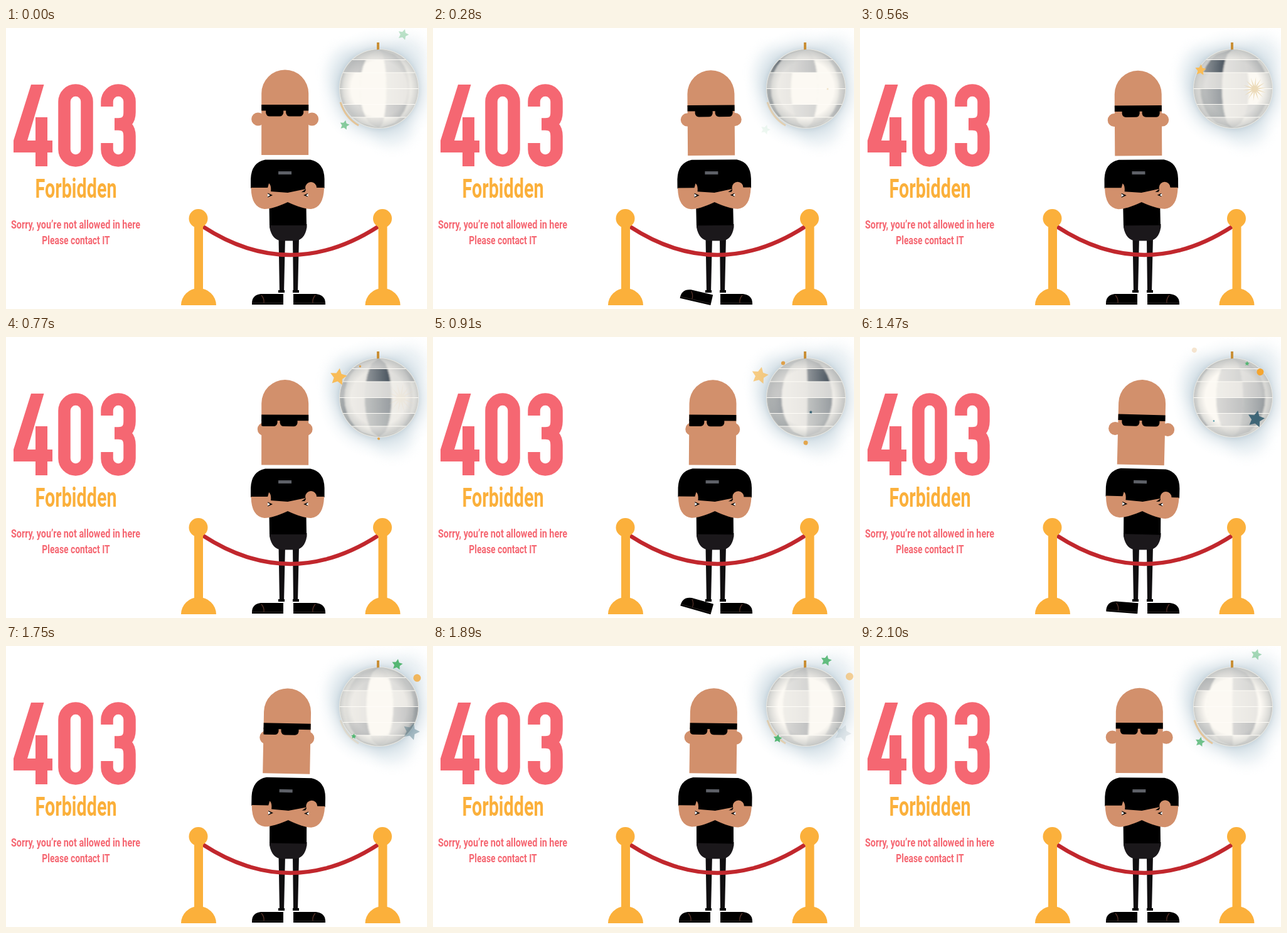
Write an HTML page that moves like this. It is 671 px wide and 447 px high and loops after 2.17 s.

```html
<!DOCTYPE html>
<html lang="en">
<head>
<meta charset="utf-8">
<title>403 Forbidden</title>
<style>
  html, body { margin: 0; width: 100%; height: 100%; overflow: hidden; background: #fff; }
  svg { display: block; width: 100%; height: 100%; }
  text { font-family: Roboto, "Liberation Sans", sans-serif; font-weight: 700; text-anchor: middle; }
  .skin { fill: #d2906c; }
  .gold { fill: #fbb03b; }
  .pink { fill: #f56772; }
</style>
</head>
<body>
<svg viewBox="0 0 671 447" xmlns="http://www.w3.org/2000/svg">
  <defs id="defs">
    <radialGradient id="glow">
      <stop offset=".62" stop-color="#a6bac6" stop-opacity=".65"/>
      <stop offset=".72" stop-color="#bccdd7" stop-opacity=".38"/>
      <stop offset=".86" stop-color="#d5e2e9" stop-opacity=".16"/>
      <stop offset="1" stop-color="#e6eef2" stop-opacity="0"/>
    </radialGradient>
    <radialGradient id="shade">
      <stop offset=".7" stop-color="#8a8f90" stop-opacity="0"/>
      <stop offset="1" stop-color="#767f84" stop-opacity=".35"/>
    </radialGradient>
    <filter id="soft" x="-10%" width="120%"><feGaussianBlur stdDeviation="1.6 0"/></filter>
    <filter id="haze" x="-50%" y="-50%" width="200%" height="200%"><feGaussianBlur stdDeviation="10"/></filter>
    <clipPath id="sphere"><circle cx="594.5" cy="96.5" r="62.5"/></clipPath>
    <clipPath id="face"><rect x="407" y="110" width="75" height="40"/></clipPath>
    <g id="post" class="gold">
      <circle cy="303" r="15"/>
      <rect x="-6.5" y="303" width="14" height="115"/>
      <path d="M-27.5 441a28 27 0 0 1 56 0z"/>
    </g>
  </defs>

  <g role="img" aria-label="403">
    <path class="pink" d="M40 90H60.500L34 179H47V142H66V179H74V198H66V220H47V198H12V179Z"/>
    <g fill="none" stroke="#f56772" stroke-width="19.5">
      <rect x="93" y="99" width="36" height="112" rx="18"/>
      <path d="M161 125V117a18 18 0 0 1 36 0V134q0 19-18 19h-6h6q18 0 18 19V193a18 18 0 0 1-36 0V183"/>
    </g>
  </g>
  <text class="gold" font-size="42" transform="translate(111.500 270) scale(.685 1)">Forbidden</text>
  <g class="pink" font-size="18">
    <text transform="translate(111 318.500) scale(.8 1)">Sorry, you’re not allowed in here</text>
    <text transform="translate(111.500 343.500) scale(.77 1)">Please contact IT</text>
  </g>

  <g id="disco">
    <g fill="#cddce4" filter="url(#haze)" opacity=".4">
      <ellipse cx="542" cy="70" rx="30" ry="40"/>
      <ellipse cx="640" cy="44" rx="30" ry="30"/>
      <ellipse cx="616" cy="162" rx="32" ry="26"/>
    </g>
    <circle cx="594" cy="97" r="97" fill="url(#glow)"/>
    <circle cx="594.5" cy="96.5" r="63.5" fill="#e9e8e2"/>
    <path id="rim" d="M533 118Q541 143 562 155" fill="none" stroke="#e8b877" stroke-width="3"/>
    <rect x="591" y="23" width="4" height="12" fill="#c98f36"/>
    <g clip-path="url(#sphere)">
      <g id="facets" filter="url(#soft)"></g>
      <circle cx="594.5" cy="96.5" r="63" fill="url(#shade)"/>
      <path d="M530 50.500H660M530 71H660M530 96.500H660M530 121.500H660M530 142H660" stroke="#fffdf8" stroke-width="1.200"/>
    </g>
    <g id="sparks"></g>
  </g>

  <path d="M434.500 333H445L443 421H436ZM457 333H467L465 421H458Z" fill="#100e10"/>
  <path d="M434 417h10v4h-10zM457 417h10v4h-10z" fill="#000"/>
  <g id="leftShoe">
    <path d="M392 440Q391 425 406 423H442V440Z"/>
    <path d="M407 425Q412 431 411 437" fill="none" stroke="#593329" stroke-width="1.200"/>
    <path d="M392 437.500H442" stroke="#2a2423"/>
  </g>
  <path d="M509 440Q510 425 494 423H458V440Z"/>
  <path d="M493 425Q488 431 489 437" fill="none" stroke="#593329" stroke-width="1.200"/>
  <path d="M458 437.500H509" stroke="#2a2423"/>
  <path d="M420 312H479.500V317Q476 338 460 338.500H440Q424 338 420 317Z" fill="#1b181b"/>

  <g id="upper">
    <path d="M413 209.500H485Q507 214 507.500 240V255H478L479 314H420L419 255H390V240Q391 214 413 209.500Z"/>
    <rect x="434" y="228" width="21" height="5" fill="#5d6067"/>
    <g class="skin">
      <path d="M390.500 254H417L419 247Q423 250 422 260L449 262L478 256L449 277Q425 288 412 288Q391 286 390.500 254Z"/>
      <path d="M507 254H480L476 261L449 262L422 262L449 277Q473 288 486 288Q506 286 507 254Z"/>
      <circle cx="486" cy="254" r="9"/>
    </g>
    <path d="M417 262.500L425 266L417 269.500ZM481 263V268.500L474 266Z"/>
    <path d="M417 263.500L421 266L417 268.500ZM481.500 263.500V268L478 266Z" fill="#fff"/>
    <g id="head">
      <g class="skin">
        <circle id="leftEar" cy="145" r="10.500"/>
        <circle id="rightEar" cy="145" r="10.500"/>
        <path d="M407 202V104a37.500 37.500 0 0 1 75 0V202Z"/>
      </g>
      <rect x="407" y="122" width="75" height="9.500"/>
      <g clip-path="url(#face)">
        <path id="lenses" d="M414 130H442V135Q441 140.500 436 140.500H420Q415 140.500 414 135ZM446 130H474V135Q473 140.500 468 140.500H452Q447 140.500 446 135Z"/>
      </g>
    </g>
  </g>

  <path d="M314 316Q453 406 593 316" fill="none" stroke="#c1272d" stroke-width="6.300"/>
  <use href="#post" x="306.500"/>
  <use href="#post" x="600"/>
</svg>

<script>
const LOOP = 2170, STEP = 70, TAU = Math.PI * 2;
const $ = id => document.getElementById(id);
const mix = (a, b, k) => a + (b - a) * k;

function make(tag, parent, attrs = {}) {
  const el = parent.appendChild(document.createElementNS("http://www.w3.org/2000/svg", tag));
  for (const name in attrs) el.setAttribute(name, attrs[name]);
  return el;
}

// Eased value between [time, value] keys.
function track(keys, t) {
  const i = keys.findIndex(key => key[0] > t);
  const [t0, a] = keys[i - 1], [t1, b] = keys[i];
  return mix(a, b, (1 - Math.cos(Math.PI * (t - t0) / (t1 - t0))) / 2);
}

const gaze = [[0, 0], [140, 0], [420, 10], [840, -11], [1190, -11], [1470, -1], [1750, -11], [2100, 0], [LOOP, 0]];
const tap = [[0, 0], [140, 0], [280, 13], [420, 0], [770, 0], [910, 16], [1050, 0], [1260, 0], [1400, 9], [1540, 0], [LOOP, 0]];

// Mirror ball: each digit is the darkness of one facet around a row.
const ball = { x: 594.5, y: 96.5, r: 63 };
const rowEdges = [33.5, 50.5, 71, 96.5, 121.5, 142, 159.5];
const tones = ["311121121", "923020221", "210010131", "510010351", "412030241", "210101120"];
const slice = 40, facets = [];

const silver = k => `rgb(${mix(252, 84, k)},${mix(249, 94, k)},${mix(243, 104, k)})`;
for (let tone = 0; tone < 10; tone++) {
  const gradient = make("linearGradient", $("defs"), { id: "tone" + tone });
  make("stop", gradient, { offset: 0, "stop-color": silver(tone * .07) });
  make("stop", gradient, { offset: 1, "stop-color": silver(tone * .12) });
}
tones.forEach((row, r) => [...row].forEach((tone, c) => {
  const el = make("path", $("facets"), { fill: `url(#tone${tone})` });
  facets.push({ el, r, angle: -129 + slice * c });
}));

function drawBall(t) {
  const edgeX = (deg, y) => {
    const half = Math.sqrt(Math.max(0, ball.r ** 2 - (y - ball.y) ** 2));
    return (ball.x + half * Math.sin(deg * TAU / 360)).toFixed(2);
  };
  const clamp = deg => Math.max(-90, Math.min(90, deg));
  for (const { el, r, angle } of facets) {
    const mid = ((angle + 360 * t / LOOP + 180) % 360 + 360) % 360 - 180;
    const a = clamp(mid - slice / 2), b = clamp(mid + slice / 2);
    const top = rowEdges[r], low = rowEdges[r + 1], y = (top + low) / 2;
    el.setAttribute("d", a === b ? "" :
      `M${edgeX(a, top)} ${top}L${edgeX(b, top)} ${top}L${edgeX(b, y)} ${y}L${edgeX(b, low)} ${low}` +
      `L${edgeX(a, low)} ${low}L${edgeX(a, y)} ${y}Z`);
  }
  $("rim").setAttribute("opacity", Math.max(0, .7 * Math.cos(TAU * t / LOOP)));
}

// Unit shapes for the sparks.
function star(points, inner) {
  const parts = Array.from({ length: points * 2 }, (_, i) => {
    const r = i % 2 ? inner : 1, a = i * Math.PI / points - Math.PI / 2;
    return `${(r * Math.cos(a)).toFixed(3)} ${(r * Math.sin(a)).toFixed(3)}`;
  });
  return `M${parts.join("L")}Z`;
}
const shapes = {
  star: star(5, .5),
  burst: star(14, .25),
  dot: "M-1 0A1 1 0 1 1 1 0A1 1 0 1 1 -1 0Z"
};

// shape, colour, size, start [time, x, y], end [time, x, y]
const sparks = [
  ["burst", "#ead7b2", 24, [240, 629, 97], [820, 629, 97]],
  ["star", "#f8bc58", 14, [300, 559, 71], [1260, 499, 56]],
  ["dot", "#dfa04a", 4, [600, 572, 53], [1600, 527, 16]],
  ["dot", "#e3a64d", 4, [560, 594, 152], [1270, 594, 185]],
  ["star", "#2b596c", 14, [830, 598, 118], [1950, 656, 140]],
  ["dot", "#f5a52f", 6, [1100, 615, 62], [2150, 680, 44]],
  ["star", "#54b673", 9, [1300, 613, 50], [2380, 638, 1]],
  ["star", "#54b673", 8, [1530, 562, 138], [2500, 528, 163]],
  ["dot", "#4b96a6", 3, [1300, 566, 132], [1620, 562, 135]]
].map(([shape, fill, size, from, to]) =>
  ({ el: make("path", $("sparks"), { d: shapes[shape], fill }), size, from, to }));

function drawSparks(t) {
  for (const { el, size, from, to } of sparks) {
    const age = (t - from[0] + LOOP) % LOOP, p = age / (to[0] - from[0]);
    const r = size * Math.min(1, age / 400);
    const x = mix(from[1], to[1], p), y = mix(from[2], to[2], p);
    el.setAttribute("transform", `translate(${x} ${y}) rotate(${age * .02}) scale(${r})`);
    el.setAttribute("opacity", Math.max(0, Math.min(1, 2 * (1 - p))));
  }
}

function drawBouncer(t) {
  const sway = 2 - 4 * Math.cos(TAU * (t - 385) / LOOP);
  const turn = track(gaze, t), tuck = Math.min(10, Math.abs(turn));
  $("upper").setAttribute("transform", `rotate(${sway * .23} 449 318)`);
  $("head").setAttribute("transform", `translate(0 ${1.8 * Math.sin(Math.PI * t / LOOP)})`);
  $("lenses").setAttribute("transform", `translate(${turn} 0)`);
  $("leftEar").setAttribute("cx", 401.5 + tuck);
  $("rightEar").setAttribute("cx", 487.5 - tuck);
  $("leftShoe").setAttribute("transform", `rotate(${track(tap, t)} 438 442)`);
}

function draw(t) {
  drawBall(t);
  drawSparks(t);
  drawBouncer(t);
}

const start = performance.now();
function tick() {
  const t = (performance.now() - start) % LOOP;
  draw(Math.floor(t / STEP) * STEP);
  requestAnimationFrame(tick);
}
tick();
</script>
</body>
</html>
```
